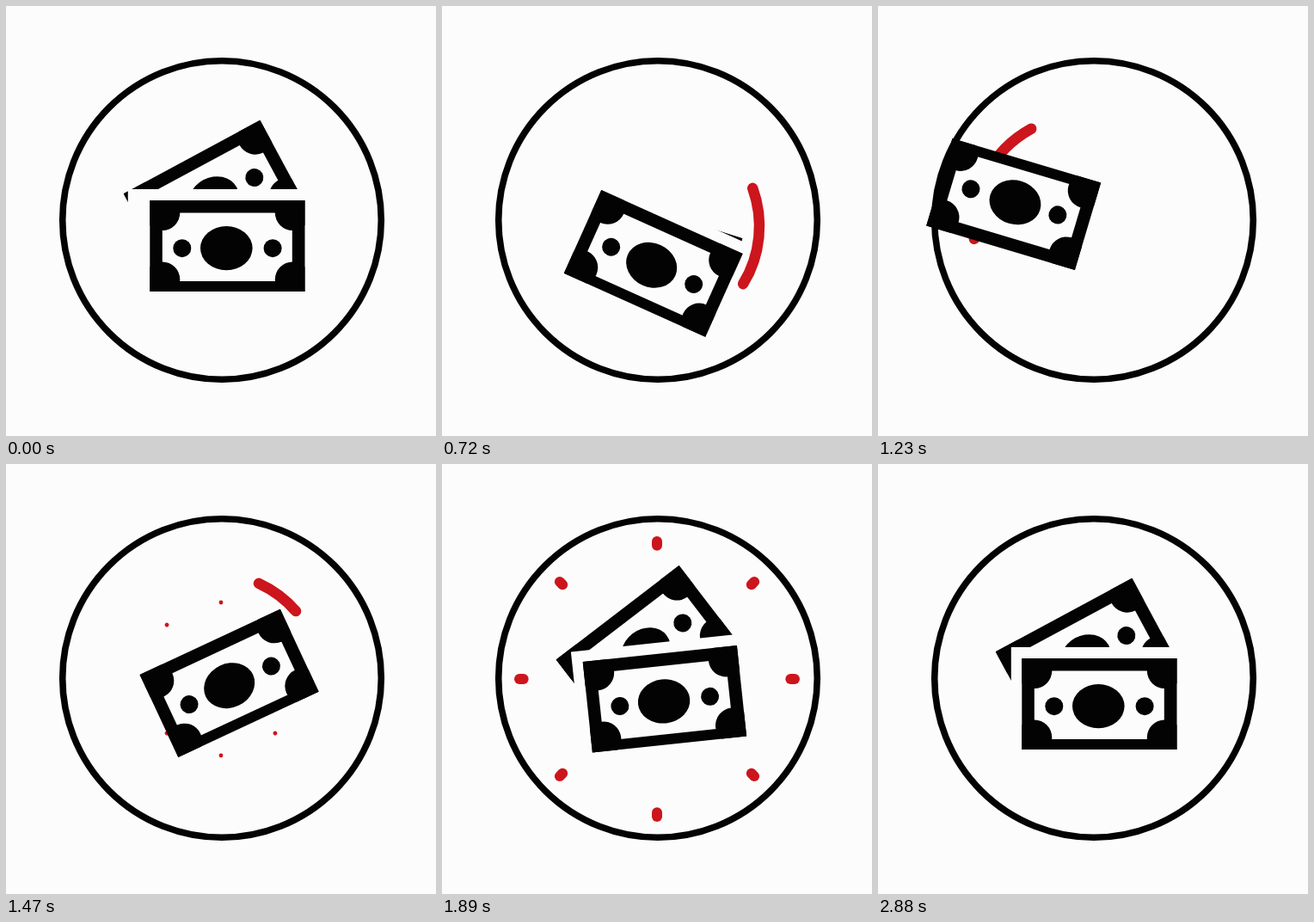
An HTML page with a canvas for the animation above (2910 ms loop, 500 by 500 pixels).

```html
<!DOCTYPE html>
<html lang="en">
<head>
<meta charset="utf-8">
<title>Money cycle</title>
<style>
html, body { margin: 0; width: 100%; height: 100%; overflow: hidden; background: #fcfcfc; }
canvas { display: block; }
</style>
</head>
<body>
<canvas id="stage" width="500" height="500"></canvas>
<script>
const ctx = document.getElementById('stage').getContext('2d');
const LOOP = 2910, STEP = 30, END = 2880;
const PAPER = '#fcfcfc', INK = '#030303', RED = '#cc151c';
const RAD = Math.PI / 180;

const clamp = v => Math.min(1, Math.max(0, v));
const ramp = (t, from, to) => clamp((t - from) / (to - from));
const smooth = v => v * v * (3 - 2 * v);
const easeOut = v => 1 - (1 - v) ** 3;

// Front note: a cubic start into one full turn, then a long quartic settle.
const turn = t => t < 1420
  ? 1.88e-7 * Math.max(0, t - 215) ** 3
  : 360 - 25 * ((END - t) / 1410) ** 4;

// Back note: 1 is open, 0 is hidden; it reopens with a slow overshoot.
const spread = t => 1 - smooth(ramp(t, 0, 1050))
  + smooth(ramp(t, 1480, 1860)) * (1 + .11 * (END - t) / 990);

function box(x0, y0, x1, y1, color) {
  ctx.fillStyle = color;
  ctx.fillRect(x0, y0, x1 - x0, y1 - y0);
}

function oval(x, y, rx, ry = rx) {
  ctx.beginPath();
  ctx.ellipse(x, y, rx, ry, 0, 0, 2 * Math.PI);
  ctx.fill();
}

// Banknote around its own centre.
function note() {
  ctx.save();
  ctx.beginPath();
  ctx.rect(-90, -53, 180.2, 106);
  ctx.clip();
  box(-91, -54, 91, 54, INK);
  box(-75.5, -38.5, 75.5, 41, PAPER);
  ctx.fillStyle = INK;
  for (const x of [-75.5, 76]) {
    oval(x, -38.5, 20.5);
    oval(x, 39, 20.5);
  }
  for (const x of [-52.5, 52.8]) oval(x, 2.7, 10.5);
  oval(-1, 2.6, 30.3, 25.6);
  ctx.restore();
}

// Runs a drawing in the turning frame of the front note.
function inFront(angle, paint) {
  ctx.save();
  ctx.translate(204, 262);
  ctx.rotate(angle * RAD);
  ctx.translate(53.3, 17);
  paint();
  ctx.restore();
}

function notesBehind(t) {
  const open = spread(t);
  ctx.save();
  ctx.translate(-16.2 * clamp(open * open), -61.4 * smooth(open / 1.2));
  ctx.rotate(-28.3 * open * RAD);
  note();
  ctx.restore();
  // The gap around the front note is wider on the left while closing.
  box(t < 1000 ? -115.5 : -102.5, -66, 103, 66, PAPER);
}

function trail(t) {
  const head = smooth(ramp(t, 430, 1650)), tail = smooth(ramp(t, 733, 1680));
  if (head === tail) return;
  ctx.lineWidth = 12.5 * Math.min(ramp(t, 380, 550), ramp(t, 1700, 1500));
  ctx.beginPath();
  ctx.arc(240, 256, 129, (tail * 360 - 20) * RAD, (head * 360 - 20) * RAD);
  ctx.stroke();
}

function ticks(t) {
  if (t < 1470 || t >= 2140) return;
  const reach = at => 89 + 72 * easeOut(ramp(at, 1470, 2030));
  const inner = reach(t - 100), outer = reach(t) + .1;
  ctx.lineWidth = 12 * Math.min(ramp(t, 1410, 1560), ramp(t, 2140, 1960));
  for (let i = 0; i < 8; i++) {
    const c = Math.cos(i * Math.PI / 4), s = Math.sin(i * Math.PI / 4);
    ctx.beginPath();
    ctx.moveTo(250 + inner * c, 250 + inner * s);
    ctx.lineTo(250 + outer * c, 250 + outer * s);
    ctx.stroke();
  }
}

function draw(t) {
  const angle = turn(t);
  box(0, 0, 500, 500, PAPER);
  inFront(angle, () => notesBehind(t));

  ctx.strokeStyle = INK;
  ctx.lineWidth = 7.6;
  ctx.beginPath();
  ctx.arc(251, 249, 185.3, 0, 2 * Math.PI);
  ctx.stroke();

  ctx.strokeStyle = RED;
  ctx.lineCap = 'round';
  trail(t);
  ticks(t);

  inFront(angle, note);
}

function tick() {
  const t = Math.floor(performance.now() % LOOP / STEP) * STEP;
  draw(t < 60 ? 0 : t);
  requestAnimationFrame(tick);
}
tick();
</script>
</body>
</html>
```
